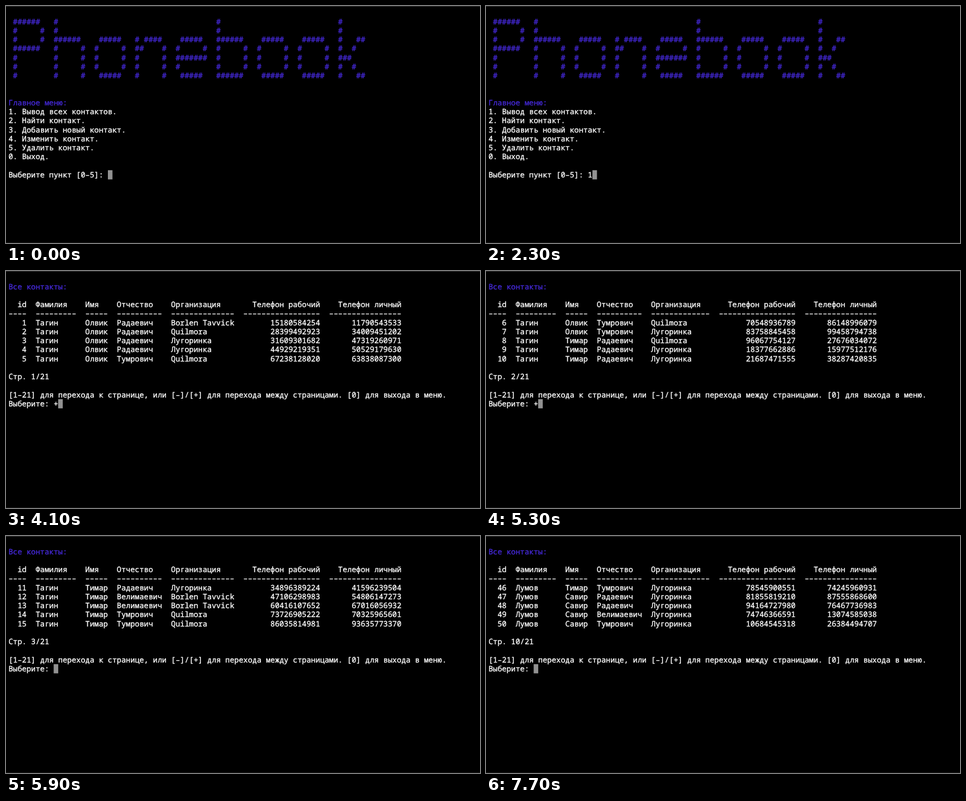
Recreate the animation shown at these times as an HTML page. Size 800 by 401 pixels, loop 8000 ms.

```html
<!DOCTYPE html>
<html lang="ru">
<head>
<meta charset="utf-8">
<title>Phonebook</title>
<style>
  html, body { margin: 0; width: 100%; height: 100%; overflow: hidden; background: #000; }
  svg { display: block; width: 100%; height: 100%; }
  text {
    font: 500 12.71px "Noto Sans Mono", "DejaVu Sans Mono", monospace;
    fill: currentColor;
    stroke: currentColor;
    stroke-width: .35px;
    white-space: pre;
    text-rendering: geometricPrecision;
    font-variant-ligatures: none;
  }
</style>
</head>
<body>
<svg id="stage" viewBox="0 0 800 401">
  <rect width="800" height="401" fill="#000"/>
  <rect width="800" height="1" fill="#303030"/>
  <rect y="400" width="800" height="1" fill="#181818"/>
  <rect id="cursor" width="7.7" height="15.6" fill="#929292"/>
</svg>
<script>
const LOOP = 8000;
const LEFT = 4.2, TOP = 3.3, CELL = 7.626, LINE = 15.25, BASE = 12;
const ACCENT = "#4529d8", PLAIN = "#fff";

const BANNER = [
  " ######   #                                   #                          #",
  " #     #  #                                   #                          #",
  " #     #  ######    #####   # ####    #####   ######    #####    #####   #   ##",
  " ######   #     #  #     #  ##    #  #     #  #     #  #     #  #     #  #  #",
  " #        #     #  #     #  #     #  #######  #     #  #     #  #     #  ###",
  " #        #     #  #     #  #     #  #        #     #  #     #  #     #  #  #",
  " #        #     #   #####   #     #   #####   ######    #####    #####   #   ##"
];

const MENU = [
  "", ...BANNER, "", "",
  "Главное меню:",
  "1. Вывод всех контактов.",
  "2. Найти контакт.",
  "3. Добавить новый контакт.",
  "4. Изменить контакт.",
  "5. Удалить контакт.",
  "0. Выход.",
  "",
  "Выберите пункт [0-5]: "
];

const HEADS = ["id", "Фамилия", "Имя", "Отчество", "Организация", "Телефон рабочий", "Телефон личный"];
const NUMERIC = [0, 5, 6];
const TITLE = ["", "Все контакты:", ""];

const NAMES = { o: "Олвик", t: "Тимар", s: "Савир" };
const PATRONYMICS = { r: "Радаевич", u: "Тумрович", v: "Велимаевич" };
const FIRMS = { b: "Borlen Tavvick", q: "Quilmora", l: "Лугоринка" };

// Each code gives first name, patronymic and firm.
const PAGES = {
  1: { surname: "Тагин", people: "orb orq orl orl ouq" },
  2: { surname: "Тагин", people: "ouq oul trq trl trl" },
  3: { surname: "Тагин", people: "trl tvb tvb tuq tuq" },
  10: { surname: "Лумов", people: "tul srl srl svl sul" }
};

function phone(seed) {
  let x = seed * 7919 + 17, digits = "";
  while (digits.length < 11) {
    x = (x * 16807) % 2147483647;
    const d = Math.floor(x / 2147483647 * 10);
    if (digits || d) digits += d;
  }
  return digits;
}

function tablePage(page) {
  const { surname, people } = PAGES[page];
  const rows = people.split(" ").map(([n, p, f], i) => {
    const id = (page - 1) * 5 + i + 1;
    return [String(id), surname, NAMES[n], PATRONYMICS[p], FIRMS[f], phone(id * 2), phone(id * 2 + 1)];
  });
  const widths = HEADS.map((h, c) => Math.max(h.length + 2, ...rows.map(r => r[c].length)));
  const join = cells => cells.map((s, c) =>
    NUMERIC.includes(c) ? s.padStart(widths[c]) : s.padEnd(widths[c])).join("  ");
  return [
    ...TITLE,
    join(HEADS),
    join(widths.map(w => "-".repeat(w))),
    ...rows.map(join),
    "",
    `Стр. ${page}/21`,
    "",
    "[1-21] для перехода к странице, или [-]/[+] для перехода между страницами. [0] для выхода в меню.",
    "Выберите: "
  ];
}

const menu = { lines: MENU, accentTo: 10 };
const table = page => ({ lines: tablePage(page), accentTo: 1 });
const [first, second, third, tenth] = [1, 2, 3, 10].map(table);
const cleared = { lines: [...TITLE, ""], accentTo: 1 };

// Start time, screen, typed input.
const STEPS = [
  [0, menu, ""],
  [1600, menu, "1"],
  [2600, first, ""],
  [4100, first, "+"],
  [4600, second, ""],
  [5100, second, "+"],
  [5800, cleared, ""],
  [5900, third, ""],
  [6500, third, "1"],
  [6800, third, "10"],
  [7700, tenth, ""]
];

const stage = document.getElementById("stage");
const cursor = document.getElementById("cursor");
const rowTop = row => TOP + row * LINE;

// The terminal's hyphen is as wide as an en dash here.
const wideDash = s => s.replaceAll("-", "–");

const texts = MENU.map((_, row) => {
  const el = document.createElementNS("http://www.w3.org/2000/svg", "text");
  el.setAttribute("x", LEFT);
  el.setAttribute("y", rowTop(row) + BASE);
  return stage.appendChild(el);
});

let shown = null;

function draw(time) {
  const step = STEPS.findLast(s => s[0] <= time);
  if (step === shown) return;
  shown = step;
  const [, screen, input] = step;
  const last = screen.lines.length - 1;
  texts.forEach((el, row) => {
    el.textContent = wideDash(screen.lines[row] || "") + (row === last ? input : "");
    el.setAttribute("color", row <= screen.accentTo ? ACCENT : PLAIN);
  });
  cursor.setAttribute("x", LEFT + (screen.lines[last].length + input.length) * CELL);
  cursor.setAttribute("y", rowTop(last));
}

const start = performance.now();

function tick() {
  draw((performance.now() - start) % LOOP);
  requestAnimationFrame(tick);
}
tick();
</script>
</body>
</html>
```
